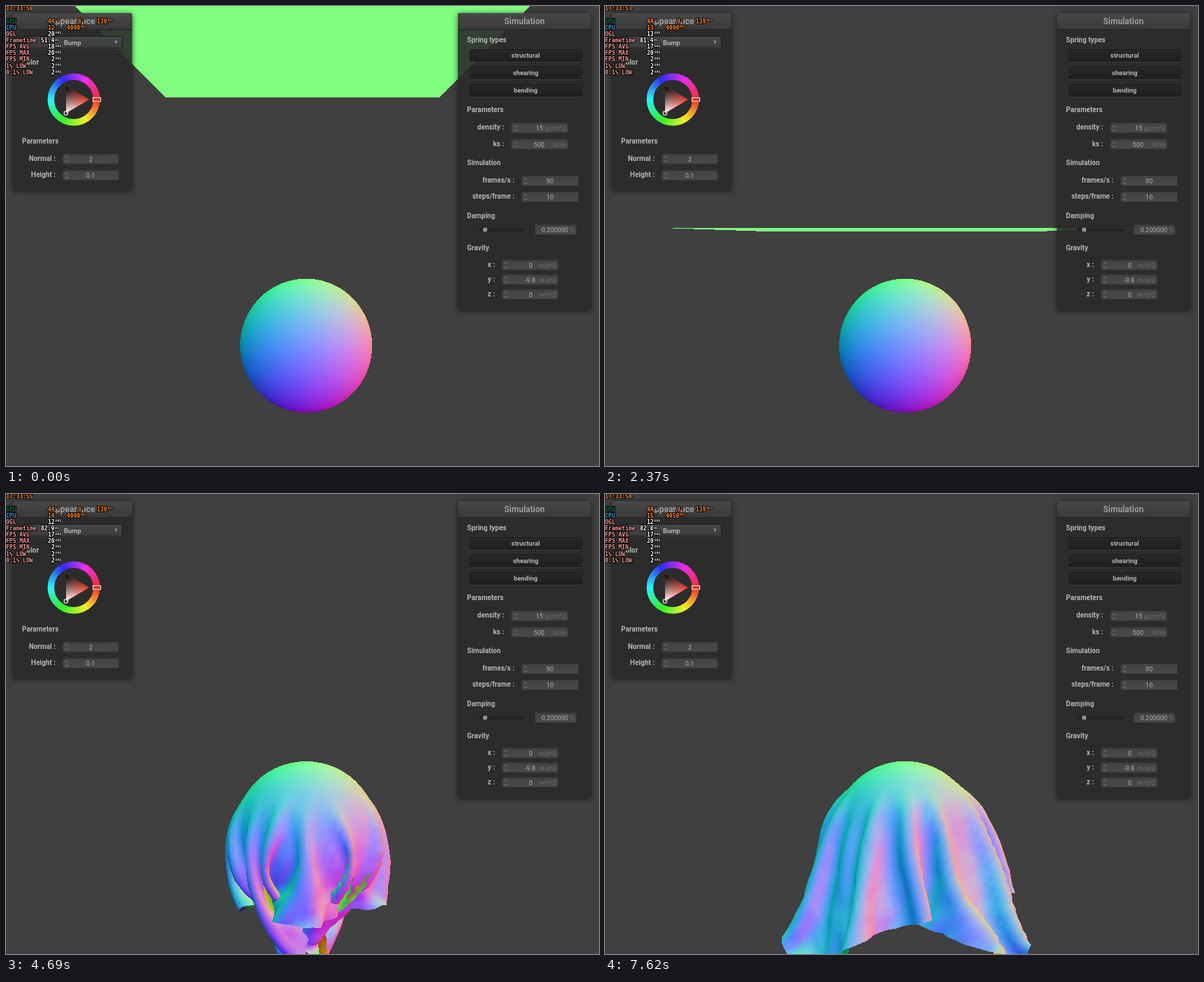
Recreate the animation shown at these times as an HTML page with a canvas. Size 849 by 659 pixels, loop 7.7 s.

```html
<!DOCTYPE html>
<html lang="en">
<head>
<meta charset="utf-8">
<title>Cloth simulation</title>
<style>
html, body { margin: 0; width: 100%; height: 100%; overflow: hidden; background: #404040; }
canvas { display: block; }
</style>
</head>
<body>
<canvas id="stage" width="849" height="659"></canvas>
<script>
const W = 849, H = 659, LOOP = 7700;
const ctx = document.getElementById('stage').getContext('2d');

// Runs of evenly spaced picture changes: first ms, last ms, count.
const RUNS = [
  [70, 830, 11], [910, 1680, 11], [1760, 2530, 11], [2600, 3370, 11],
  [3450, 3600, 3], [3750, 4520, 11], [4610, 4690, 2], [4840, 5610, 11],
  [5690, 5690, 1], [5840, 6540, 10], [6690, 7300, 9], [7470, 7620, 3]
];

function poseAt(ms) {
  let n = 0;
  for (const [from, to, count] of RUNS) {
    if (ms < from) break;
    const gap = count > 1 ? (to - from) / (count - 1) : 1;
    n += Math.min(count, Math.floor((ms - from) / gap + 0.12) + 1);
  }
  return n;
}

// ---- Cloth: mass-spring grid with Verlet integration, no self-collision ----
const N = 50, COUNT = N * N, STEP = 1 / N, SUBSTEPS = 10;
const DT2 = (1 / 90 / SUBSTEPS) ** 2, MASS = 15 / COUNT, KS = 500;
const KEEP = 1 - 0.2 / 100, GRAVITY = -9.8, FRICTION = 0.3;
const BALL = { x: 0.5, y: 0.2, z: 0.5, r: 0.2 };

const pos = new Float64Array(COUNT * 3), last = new Float64Array(COUNT * 3);
const force = new Float64Array(COUNT * 3);
const springs = [];

for (let r = 0; r < N; r++) {
  for (let c = 0; c < N; c++) {
    const i = r * N + c;
    pos.set([c * STEP, 1, r * STEP], i * 3);
    const link = (dc, dr, k) => {
      const c2 = c + dc, r2 = r + dr;
      if (c2 >= 0 && c2 < N && r2 >= 0)
        springs.push({ a: i * 3, b: (r2 * N + c2) * 3, k, rest: Math.hypot(dc, dr) * STEP });
    };
    link(-1, 0, KS); link(0, -1, KS);
    link(-1, -1, KS); link(1, -1, KS);
    link(-2, 0, KS * 0.2); link(0, -2, KS * 0.2);
  }
}
last.set(pos);

function ballCollide() {
  for (let p = 0; p < COUNT * 3; p += 3) {
    const dx = pos[p] - BALL.x, dy = pos[p + 1] - BALL.y, dz = pos[p + 2] - BALL.z;
    const d = Math.hypot(dx, dy, dz);
    if (d > BALL.r) continue;
    const s = BALL.r / d, slip = 1 - FRICTION;
    pos[p] = last[p] + (BALL.x + dx * s - last[p]) * slip;
    pos[p + 1] = last[p + 1] + (BALL.y + dy * s - last[p + 1]) * slip;
    pos[p + 2] = last[p + 2] + (BALL.z + dz * s - last[p + 2]) * slip;
  }
}

function substep() {
  force.fill(0);
  for (const { a, b, k, rest } of springs) {
    const dx = pos[b] - pos[a], dy = pos[b + 1] - pos[a + 1], dz = pos[b + 2] - pos[a + 2];
    const d = Math.sqrt(dx * dx + dy * dy + dz * dz) || 1e-9, f = k * (d - rest) / d;
    force[a] += dx * f; force[a + 1] += dy * f; force[a + 2] += dz * f;
    force[b] -= dx * f; force[b + 1] -= dy * f; force[b + 2] -= dz * f;
  }
  for (let i = 0; i < COUNT * 3; i++) {
    const acc = force[i] / MASS + (i % 3 === 1 ? GRAVITY : 0), p = pos[i];
    pos[i] = p + KEEP * (p - last[i]) + acc * DT2;
    last[i] = p;
  }
  ballCollide();
  for (const { a, b, rest } of springs) {
    const dx = pos[b] - pos[a], dy = pos[b + 1] - pos[a + 1], dz = pos[b + 2] - pos[a + 2];
    const d2 = dx * dx + dy * dy + dz * dz, max = rest * 1.1;
    if (d2 <= max * max) continue;
    const d = Math.sqrt(d2), s = (d - max) / d / 2;
    pos[a] += dx * s; pos[a + 1] += dy * s; pos[a + 2] += dz * s;
    pos[b] -= dx * s; pos[b + 1] -= dy * s; pos[b + 2] -= dz * s;
  }
}

// Poses are computed when first needed, then kept for later loops.
const poses = [Float32Array.from(pos)];
function getPose(n) {
  while (poses.length <= n) {
    for (let s = 0; s < SUBSTEPS; s++) substep();
    poses.push(Float32Array.from(pos));
  }
  return poses[n];
}

// ---- Renderer: depth buffer, colour taken from the surface normal ----
const FOCAL = 915, EYE = { x: 0.49, y: 0.504, z: 2.29 };
const image = ctx.createImageData(W, H), pixels = new Uint32Array(image.data.buffer);
const depth = new Float32Array(W * H);
const ballPixels = new Uint32Array(W * H).fill(0xff404040), ballDepth = new Float32Array(W * H);

const pack = (x, y, z) => 0xff000000 | (127.5 + 127.5 * z) << 16 | (127.5 + 127.5 * y) << 8 | (127.5 + 127.5 * x);

(function traceBall() {
  const r = BALL.r * 0.92;
  const ox = EYE.x - BALL.x, oy = EYE.y - BALL.y, oz = EYE.z - BALL.z;
  for (let y = 380; y < 595; y++) {
    for (let x = 325; x < 535; x++) {
      const dx = (x + 0.5 - W / 2) / FOCAL, dy = (H / 2 - y - 0.5) / FOCAL;
      const a = dx * dx + dy * dy + 1, b = ox * dx + oy * dy - oz;
      const disc = b * b - a * (ox * ox + oy * oy + oz * oz - r * r);
      if (disc < 0) continue;
      const t = (-b - Math.sqrt(disc)) / a, i = y * W + x;
      ballPixels[i] = pack((ox + dx * t) / r, (oy + dy * t) / r, (oz - t) / r);
      ballDepth[i] = 1 / t;
    }
  }
})();

const normal = new Float32Array(COUNT * 3), screen = new Float32Array(COUNT * 3);

function addNormal(p, a, b, c) {
  const ux = p[b] - p[a], uy = p[b + 1] - p[a + 1], uz = p[b + 2] - p[a + 2];
  const vx = p[c] - p[a], vy = p[c + 1] - p[a + 1], vz = p[c + 2] - p[a + 2];
  const x = uy * vz - uz * vy, y = uz * vx - ux * vz, z = ux * vy - uy * vx;
  for (const i of [a, b, c]) { normal[i] += x; normal[i + 1] += y; normal[i + 2] += z; }
}

function fillTriangle(a, b, c) {
  const ax = screen[a], ay = screen[a + 1], bx = screen[b], by = screen[b + 1];
  const cx = screen[c], cy = screen[c + 1];
  const area = (bx - ax) * (cy - ay) - (by - ay) * (cx - ax);
  if (Math.abs(area) < 1e-6) return;
  const x0 = Math.max(0, Math.ceil(Math.min(ax, bx, cx) - 0.5));
  const x1 = Math.min(W - 1, Math.floor(Math.max(ax, bx, cx) - 0.5));
  const y0 = Math.max(0, Math.ceil(Math.min(ay, by, cy) - 0.5));
  const y1 = Math.min(H - 1, Math.floor(Math.max(ay, by, cy) - 0.5));
  for (let y = y0; y <= y1; y++) {
    const py = y + 0.5;
    for (let x = x0; x <= x1; x++) {
      const px = x + 0.5;
      const u = ((bx - px) * (cy - py) - (by - py) * (cx - px)) / area;
      const v = ((cx - px) * (ay - py) - (cy - py) * (ax - px)) / area;
      const w = 1 - u - v;
      if (u < -1e-5 || v < -1e-5 || w < -1e-5) continue;
      const d = u * screen[a + 2] + v * screen[b + 2] + w * screen[c + 2], i = y * W + x;
      if (d <= depth[i]) continue;
      depth[i] = d;
      pixels[i] = pack(
        u * normal[a] + v * normal[b] + w * normal[c],
        u * normal[a + 1] + v * normal[b + 1] + w * normal[c + 1],
        u * normal[a + 2] + v * normal[b + 2] + w * normal[c + 2]);
    }
  }
}

function eachTriangle(fn) {
  for (let r = 0; r < N - 1; r++) {
    for (let c = 0; c < N - 1; c++) {
      const a = (r * N + c) * 3, b = a + 3, d = a + N * 3, e = d + 3;
      fn(a, d, b);
      fn(b, d, e);
    }
  }
}

function drawScene(p) {
  pixels.set(ballPixels);
  depth.set(ballDepth);
  normal.fill(0);
  eachTriangle((a, b, c) => addNormal(p, a, b, c));
  for (let i = 0; i < COUNT * 3; i += 3) {
    const inv = 1 / (EYE.z - p[i + 2]);
    screen[i] = W / 2 + FOCAL * (p[i] - EYE.x) * inv;
    screen[i + 1] = H / 2 - FOCAL * (p[i + 1] - EYE.y) * inv;
    screen[i + 2] = inv;
    // Slightly under one, so rounding never overflows a colour channel.
    const len = Math.hypot(normal[i], normal[i + 1], normal[i + 2]) * 1.0001 || 1;
    for (let k = 0; k < 3; k++) normal[i + k] /= len;
  }
  eachTriangle(fillTriangle);
  ctx.putImageData(image, 0, 0);
}

// ---- Panels ----
const LIGHT = '#b4b4b4', DIM = '#6c6c6c';

function text(str, x, y, size = 10, color = LIGHT, align = 'left', weight = 'bold') {
  ctx.font = `${weight} ${size}px Roboto, sans-serif`;
  ctx.fillStyle = color;
  ctx.textAlign = align;
  ctx.textBaseline = 'middle';
  ctx.fillText(str, x, y);
}

function vertical(y, h, top, bottom) {
  const g = ctx.createLinearGradient(0, y, 0, y + h);
  g.addColorStop(0, top);
  g.addColorStop(1, bottom);
  return g;
}

function box(x, y, w, h, fill, border) {
  ctx.beginPath();
  ctx.roundRect(x, y, w, h, 2);
  ctx.fillStyle = fill;
  ctx.fill();
  if (!border) return;
  ctx.strokeStyle = border;
  ctx.lineWidth = 1;
  ctx.stroke();
}

function panel(x, y, w, h, title) {
  ctx.save();
  ctx.beginPath();
  ctx.rect(0, 0, W, H);
  ctx.rect(x, y, w, h);
  ctx.clip('evenodd');
  ctx.shadowColor = 'rgba(0,0,0,.6)';
  ctx.shadowBlur = 9;
  ctx.shadowOffsetY = 1;
  box(x, y, w, h, '#000');
  ctx.restore();
  box(x, y, w, h, 'rgba(43,43,43,.9)');
  box(x, y, w, 24, vertical(y, 24, '#484848', '#383838'));
  ctx.fillStyle = '#4c4c4c';
  ctx.fillRect(x + 1, y, w - 2, 1);
  ctx.fillStyle = '#1d1d1d';
  ctx.fillRect(x, y + 23, w, 1);
  text(title, x + w / 2, y + 12, 12, '#9c9c9c', 'center');
}

function button(x, y, w, h, top, bottom) {
  box(x + 0.5, y + 0.5, w - 1, h - 1, vertical(y, h, top, bottom), '#1b1b1b');
  ctx.fillStyle = 'rgba(255,255,255,.09)';
  ctx.fillRect(x + 1, y + h, w - 2, 1);
}

function chevron(x, y, dx, dy) {
  ctx.beginPath();
  ctx.moveTo(x - 2 * dy - dx, y - dy - 2 * dx);
  ctx.lineTo(x + dx, y + dy);
  ctx.lineTo(x + 2 * dy - dx, y - dy + 2 * dx);
  ctx.stroke();
}

function field(x, y, w, value, valueX, unit, spinner = true) {
  box(x + 0.5, y + 0.5, w - 1, 14, vertical(y, 14, '#434343', '#494949'), '#353535');
  if (spinner) {
    ctx.strokeStyle = '#7c7c7c';
    ctx.lineWidth = 1;
    chevron(x + 6, y + 5, 0, -1);
    chevron(x + 6, y + 11, 0, 1);
  }
  text(value, valueX, y + 8.5, 9.2, '#b0b0b0', unit ? 'right' : 'center', 'normal');
  if (unit) text(unit, x + w - 3, y + 8.5, 9.2, DIM, 'right', 'normal');
}

function row(label, labelX, y, fieldX, ...rest) {
  text(label, labelX, y - 0.5, 10, LIGHT, 'right');
  field(fieldX, y - 8, ...rest);
}

function wheel(x, y) {
  ctx.save();
  ctx.translate(x, y);
  const ring = ctx.createConicGradient(0, 0, 0);
  for (let i = 0; i <= 12; i++) ring.addColorStop(i / 12, `hsl(${i * 30},88%,56%)`);
  ctx.strokeStyle = ring;
  ctx.lineWidth = 9.5;
  ctx.beginPath();
  ctx.arc(0, 0, 32.7, 0, 7);
  ctx.stroke();

  ctx.beginPath();
  ctx.moveTo(22, 0);
  ctx.lineTo(-11, 19.5);
  ctx.lineTo(-11, -19.5);
  ctx.closePath();
  let g = ctx.createLinearGradient(22, 0, -11, 19.5);
  g.addColorStop(0, '#ee3424');
  g.addColorStop(1, '#fff');
  ctx.fillStyle = g;
  ctx.fill();
  g = ctx.createLinearGradient(5.5, 9.7, -11, -19.5);
  g.addColorStop(0, 'rgba(0,0,0,0)');
  g.addColorStop(1, '#000');
  ctx.fillStyle = g;
  ctx.fill();

  ctx.strokeStyle = '#e8cfc8';
  ctx.lineWidth = 1.3;
  ctx.strokeRect(27.5, -2.7, 11, 5.4);
  ctx.beginPath();
  ctx.arc(-11, 19.5, 2.8, 0, 7);
  ctx.stroke();
  ctx.restore();
}

function drawPanels() {
  panel(10, 10.5, 170.5, 253.5, 'Appearance');
  button(23, 43, 144, 18, '#484848', '#3a3a3a');
  text('Bump', 83, 53, 9.4);
  ctx.strokeStyle = LIGHT;
  ctx.lineWidth = 1.2;
  chevron(157.5, 51.5, 1, 0);
  text('Color', 23, 81);
  wheel(97, 134);
  text('Parameters', 23, 194);
  row('Normal :', 71, 219.5, 81, 81, '2', 121.5);
  row('Height :', 71, 243, 81, 81, '0.1', 121);

  panel(647, 10.5, 190.5, 425.5, 'Simulation');
  text('Spring types', 660, 49);
  ['structural', 'shearing', 'bending'].forEach((name, i) => {
    button(664, 62 + i * 25, 161, 18, '#292929', '#1e1e1e');
    text(name, 744, 71.5 + i * 25, 9.4, LIGHT, 'center');
  });
  text('Parameters', 660, 149);
  row('density :', 713, 175, 723, 82, '15', 769, 'g/cm^2');
  row('ks :', 713, 198.5, 723, 82, '500', 771, 'N/m');
  text('Simulation', 660, 225);
  row('frames/s :', 728, 251, 738, 82, '90', 779);
  row('steps/frame :', 728, 274, 738, 82, '10', 779);
  text('Damping', 660, 301);
  box(676, 318.5, 68, 4, '#232323');
  ctx.beginPath();
  ctx.arc(686, 320.5, 4.6, 0, 7);
  ctx.fillStyle = '#222';
  ctx.fill();
  ctx.beginPath();
  ctx.arc(686, 320.5, 3.2, 0, 7);
  ctx.fillStyle = '#8f8f8f';
  ctx.fill();
  field(757, 313, 60, '0.200000', 805, '%', false);
  text('Gravity', 660, 347);
  row('x :', 700, 371.5, 710, 81, '0', 754, 'm/s^2');
  row('y :', 700, 392.5, 710, 81, '-9.8', 758, 'm/s^2');
  row('z :', 700, 413.5, 710, 81, '0', 754, 'm/s^2');
}

// ---- Performance readout: gpu temp, gpu load, cpu load, MHz, fps, frame time, average ----
const READOUT = [
  [44, 8, 12, 4000, 20, '51.4', 18], [44, 9, 15, 4000, 13, '76.2', 18],
  [44, 9, 18, 4000, 13, '83.3', 18], [44, 9, 13, 4000, 13, '81.4', 17],
  [44, 9, 15, 4000, 12, '82.9', 17], [44, 9, 14, 4000, 12, '82.9', 17],
  [43, 8, 13, 4000, 12, '83.3', 17], [44, 9, 14, 4000, 12, '82.9', 17],
  [44, 9, 15, 4050, 12, '82.8', 17]
];

function mono(str, x, y, color, size = 8) {
  ctx.font = `bold ${size}px "DejaVu Sans Mono", monospace`;
  ctx.textAlign = 'left';
  ctx.textBaseline = 'middle';
  ctx.lineJoin = 'round';
  ctx.strokeStyle = '#000';
  ctx.lineWidth = size > 6 ? 2 : 1.4;
  ctx.strokeText(str, x, y);
  ctx.fillStyle = color;
  ctx.fillText(str, x, y);
}

function reading(value, unit, x, y, color) {
  mono(value, x, y, color);
  mono(unit, x + String(value).length * 4.82 + 1, y - 1.5, color, 4.6);
}

function drawReadout(tick) {
  const [temp, gpu, cpu, mhz, fps, ms, avg] = READOUT[tick];
  const orange = '#ff8a30', pink = '#f09a90', white = '#fff';
  mono(`17:33:${50 + tick}`, 0, 4, orange);
  mono('GPU', 0, 22.5, '#1f6b48');
  reading(temp, '°C', 60, 22.5, orange);
  reading(gpu, '%', 103, 22.5, orange);
  reading(139, 'MHz', 130, 22.5, orange);
  mono('CPU', 0, 31.5, '#3a8fd0');
  reading(cpu, '%', 60, 31.5, orange);
  reading(mhz, 'MHz', 87, 31.5, orange);
  mono('OGL', 0, 40.5, pink);
  reading(fps, 'FPS', 60, 40.5, white);
  mono('Frametime', 0, 50, pink);
  reading(ms, 'ms', 50, 50, white);
  [['FPS AVG', avg], ['FPS MAX', 20], ['FPS MIN', 2], ['1% LOW', 2], ['0.1% LOW', 2]].forEach(([name, value], i) => {
    const y = 59 + i * 9.2;
    mono(name, 0, y, pink);
    reading(value, 'FPS', value > 9 ? 60 : 65, y, white);
  });
}

let shown = '';
function play(now) {
  const ms = now % LOOP, pose = poseAt(ms), tick = Math.floor(ms / 1000 + 0.8);
  const key = pose + '/' + tick;
  if (key !== shown) {
    shown = key;
    drawScene(getPose(pose));
    drawPanels();
    drawReadout(tick);
  }
  requestAnimationFrame(play);
}
play(performance.now());
</script>
</body>
</html>
```
